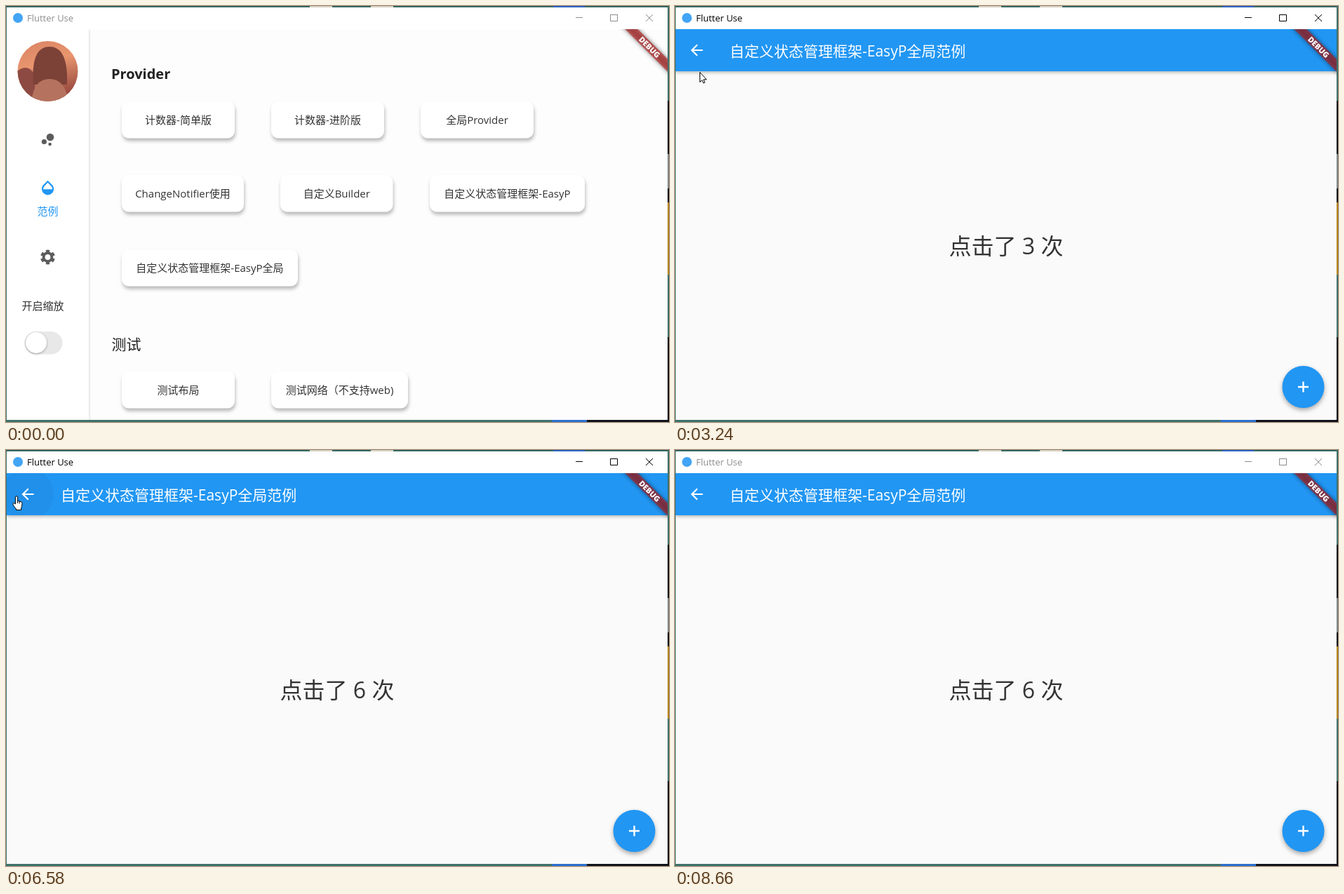
Write an HTML page that moves like this. It is 945 px wide and 593 px high and loops after 8730 ms.

```html
<!DOCTYPE html>
<html lang="zh">
<head>
<meta charset="utf-8">
<style>
html, body { margin: 0; width: 100%; height: 100%; overflow: hidden; }
svg { display: block; font: 15px "Open Sans", "Noto Sans CJK SC", "Noto Sans CJK", sans-serif; fill: #333; }
.mid { text-anchor: middle; }
.card rect { fill: #fff; filter: drop-shadow(1px 4px 2.5px #0004); }
.head { font-size: 21px; font-weight: 500; fill: #222; }
.raised { filter: drop-shadow(0 3px 3px #0005); }
.icon { fill: #5c5c5c; }
.blue { fill: #2196f3; }
</style>
</head>
<body>
<svg width="945" height="593" viewBox="0 0 945 593">
  <defs>
    <clipPath id="content"><rect x="1" y="33" width="942" height="557"/></clipPath>
    <clipPath id="bar"><rect x="1" y="33" width="942" height="60"/></clipPath>
    <clipPath id="round"><circle cx="59.5" cy="93" r="43"/></clipPath>
    <linearGradient id="dusk" x2=".3" y2="1">
      <stop stop-color="#d98263"/><stop offset=".45" stop-color="#e9966f"/><stop offset="1" stop-color="#9a4a40"/>
    </linearGradient>
  </defs>

  <g id="desktop">
    <rect width="945" height="593" fill="#3d716b"/>
  </g>
  <rect x="1" y="2" width="942" height="588" fill="#fff"/>

  <circle cx="17" cy="17" r="7" fill="#42a5f5"/>
  <g id="caption">
    <text x="30" y="22" font-size="13" fill="#000">Flutter Use</text>
    <path d="M812 16.5h10M861.5 12.5h10v9h-10zM912 12l10 10m0-10l-10 10" fill="none" stroke="#000"/>
  </g>

  <g clip-path="url(#content)">
    <g id="home">
      <rect x="1" y="33" width="942" height="557" fill="#fdfdfd"/>
      <rect x="-9" y="33" width="127" height="570" fill="#fff" style="filter:drop-shadow(1px 0 1.5px #0002)"/>
      <g clip-path="url(#round)">
        <rect x="16" y="50" width="87" height="87" fill="url(#dusk)"/>
        <path d="M16 93q15-12 25 5v40H16z" fill="#8c4a42"/>
        <path d="M39 112Q35 58 62 58t25 54z" fill="#7c4238"/>
        <path d="M36 138q3-34 26-34t27 34z" fill="#b5735f"/>
      </g>
      <g class="icon">
        <circle cx="54.4" cy="193.5" r="3.6"/><circle cx="62.6" cy="197" r="2.3"/><circle cx="63" cy="187" r="5.3"/>
      </g>
      <path class="blue" transform="translate(46.7 246.2) scale(1.07)" fill-rule="evenodd" d="M17.66 8L12 2.35 6.34 8C4.78 9.56 4 11.64 4 13.64s.78 4.11 2.34 5.67 3.61 2.35 5.66 2.35 4.1-.79 5.66-2.35S20 15.64 20 13.64 19.22 9.56 17.66 8zM6 14c.01-2 .62-3.27 1.76-4.4L12 5.27l4.24 4.38C17.38 10.77 17.99 12 18 14z"/>
      <text class="mid blue" x="59.5" y="298">范例</text>
      <g fill="none" stroke="#5c5c5c">
        <circle cx="59.5" cy="358" r="5.9" stroke-width="4"/>
        <circle cx="59.5" cy="358" r="8.8" stroke-width="3.4" pathLength="12" stroke-dasharray="1.1 .9" stroke-dashoffset="-.45"/>
      </g>
      <text class="mid" x="52.5" y="433">开启缩放</text>
      <rect x="26.5" y="464" width="54" height="32.5" rx="16.2" fill="#e8e8e8"/>
      <circle cx="43" cy="480" r="15" fill="#fff" style="filter:drop-shadow(0 1px 1.5px #0005)"/>
      <text class="head" x="150" y="104" style="font-size:20px;font-weight:700">Provider</text>
      <text class="head" x="150.5" y="489.5">测试</text>
    </g>

    <g id="page">
      <rect x="1" y="33" width="942" height="557" fill="#fafafa"/>
      <rect class="blue" x="1" y="33" width="942" height="60" style="filter:drop-shadow(0 2px 2px #0004)"/>
      <circle id="hover" cx="31" cy="63" r="37" fill="#000" opacity=".04" clip-path="url(#bar)"/>
      <path fill="#fff" transform="translate(18.2 50.2) scale(1.07)" d="M20 11H7.83l5.59-5.59L12 4l-8 8 8 8 1.41-1.41L7.83 13H20z"/>
      <text x="78" y="72" font-size="21" fill="#fff">自定义状态管理框架-EasyP全局范例</text>
      <text id="count" class="mid" x="472" y="354" font-size="32"></text>
      <circle class="blue raised" cx="895.5" cy="543" r="30"/>
      <path d="M888 543h15m-7.5-7.5v15" stroke="#fff" stroke-width="2.4"/>
    </g>

    <g transform="translate(943 33) rotate(45)">
      <rect x="-60" y="30" width="120" height="12.8" fill="#b71c1c" fill-opacity=".63" style="filter:drop-shadow(0 0 3px #000c)"/>
      <text class="mid" y="40.3" font-size="10.9" font-weight="800" fill="#fff">DEBUG</text>
    </g>
  </g>

  <g id="cursor" fill="#fff" stroke="#000" stroke-linejoin="round">
    <path id="arrow" d="M.5.5V14.5L3.6 11.6 5.6 16 7.6 15.1 5.7 10.8H10z"/>
    <path id="hand" d="M-1.6 11V1.4a1.6 1.6 0 0 1 3.2 0V6.5l4.6 1.2q2 .5 1.8 2.6l-.5 4q-.3 1.6-1 2.6V19.5H-.5V18q-2-1.6-4-5.3-1.2-2.2 0-3 1.2-.6 2.9 1.3zM1.6 6.5V10M4.2 7.2V10.5"/>
  </g>
</svg>

<script>
const LOOP = 8730, STEP = 69.35, ROUTE = 300;
const visits = [[1000, 3560], [4230, 6620], [7334, LOOP + 999]];
const clicks = [2150, 2400, 2650, 5500, 5700, 5900];
const cards = [
  [165, 136, 161, '计数器-简单版'], [378, 136, 161, '计数器-进阶版'], [591, 136, 161, '全局Provider'],
  [165, 241, 174, 'ChangeNotifier使用'], [391, 241, 160.5, '自定义Builder'], [604, 241, 221, '自定义状态管理框架-EasyP'],
  [165, 347, 251, '自定义状态管理框架-EasyP全局'],
  [165, 521, 161, '测试布局'], [378, 521, 195, '测试网络（不支持web)']
];
// time, x, y
const path = [
  [130, 944, 592], [780, 322, 384], [1250, 322, 384], [1880, 870, 540], [2000, 870, 540],
  [2200, 895, 545], [2750, 895, 545], [3250, 35, 94], [3430, 28, 66], [3600, 28, 66],
  [4090, 319, 382], [5100, 319, 382], [5430, 893, 548], [5960, 893, 548], [6440, 15, 66],
  [6870, 15, 66], [7140, 310, 362], [7340, 310, 362], [7550, 919, 549], [7650, 919, 549],
  [8120, 926, 578], [8250, 926, 578], [8460, 944, 592]
];
// x, y, width, height, colour of what shows around the window
const edges = [
  [0, 0, 945, 1, '#2f5f5c'], [433, 0, 32, 2, '#d8cfc0'], [520, 0, 32, 2, '#d8cfc0'], [780, 0, 45, 2, '#2a62c4'],
  [778, 590, 50, 3, '#2b6fd0'], [828, 590, 117, 3, '#10131a'],
  [943, 135, 2, 76, '#0c0f18'], [943, 211, 2, 49, '#7d8588'], [943, 260, 2, 20, '#0c0f18'],
  [943, 280, 2, 103, '#b5851c'], [943, 472, 2, 121, '#0c0f18']
];

const $ = id => document.getElementById(id);
const show = (id, on) => $(id).style.display = on ? '' : 'none';
const clamp = v => Math.min(1, Math.max(0, v));

function bezier(x1, y1, x2, y2) {
  const at = (a, b, s) => 3 * a * s * (1 - s) ** 2 + 3 * b * s * s * (1 - s) + s ** 3;
  return x => {
    let lo = 0, hi = 1;
    for (let i = 0; i < 24; i++) {
      const mid = (lo + hi) / 2;
      if (at(x1, x2, mid) < x) lo = mid; else hi = mid;
    }
    return at(y1, y2, (lo + hi) / 2);
  };
}
const fade = bezier(.42, 0, 1, 1), slide = bezier(.4, 0, .2, 1), glide = bezier(.4, 0, .6, 1);

function pointer(t) {
  const i = path.findIndex(k => k[0] > t);
  if (i < 1) return path.at(i).slice(1);
  const [a, b] = [path[i - 1], path[i]], p = glide((t - a[0]) / (b[0] - a[0]));
  return [a[1] + (b[1] - a[1]) * p, a[2] + (b[2] - a[2]) * p];
}

function draw(t) {
  const active = t >= 820 && t < 8600;
  $('caption').setAttribute('opacity', active ? 1 : .45);

  const shown = Math.max(...visits.map(([enter, leave]) =>
    Math.min(clamp((t - enter) / ROUTE), clamp(1 - (t - leave) / ROUTE))));
  const onPage = visits.some(([enter, leave]) => t >= enter && t < leave);
  show('page', shown > 0);
  $('page').setAttribute('opacity', fade(shown));
  $('page').setAttribute('transform', `translate(0 ${Math.ceil((1 - slide(shown)) * 139 - .01)})`);
  $('count').textContent = `点击了 ${clicks.filter(c => c <= t).length} 次`;

  const [x, y] = pointer(t);
  const onBack = onPage && y < 93 && Math.hypot(x - 31, y - 63) < 37;
  const onAdd = onPage && Math.hypot(x - 895.5, y - 543) < 30;
  const onCard = !onPage && cards.some(([cx, cy, w]) => x > cx && x < cx + w && y > cy && y < cy + 52);
  const hand = onBack || onAdd || onCard;
  show('hover', onBack);
  show('cursor', t >= 130 && t < 8460);
  show('hand', hand);
  show('arrow', !hand);
  $('cursor').setAttribute('transform', `translate(${Math.round(x)} ${Math.round(y)})`);
}

$('desktop').innerHTML += edges.map(([x, y, w, h, c]) =>
  `<rect x="${x}" y="${y}" width="${w}" height="${h}" fill="${c}"/>`).join('');
$('home').innerHTML += cards.map(([x, y, w, label]) =>
  `<g class="card"><rect x="${x}" y="${y}" width="${w}" height="52.5" rx="10"/>
   <text class="mid" x="${x + w / 2}" y="${y + 32}">${label}</text></g>`).join('');

function tick() {
  const t = performance.now() % LOOP;
  draw(t < 130 ? 0 : 130 + Math.floor((t - 110) / STEP) * STEP);
  requestAnimationFrame(tick);
}
tick();
</script>
</body>
</html>
```
